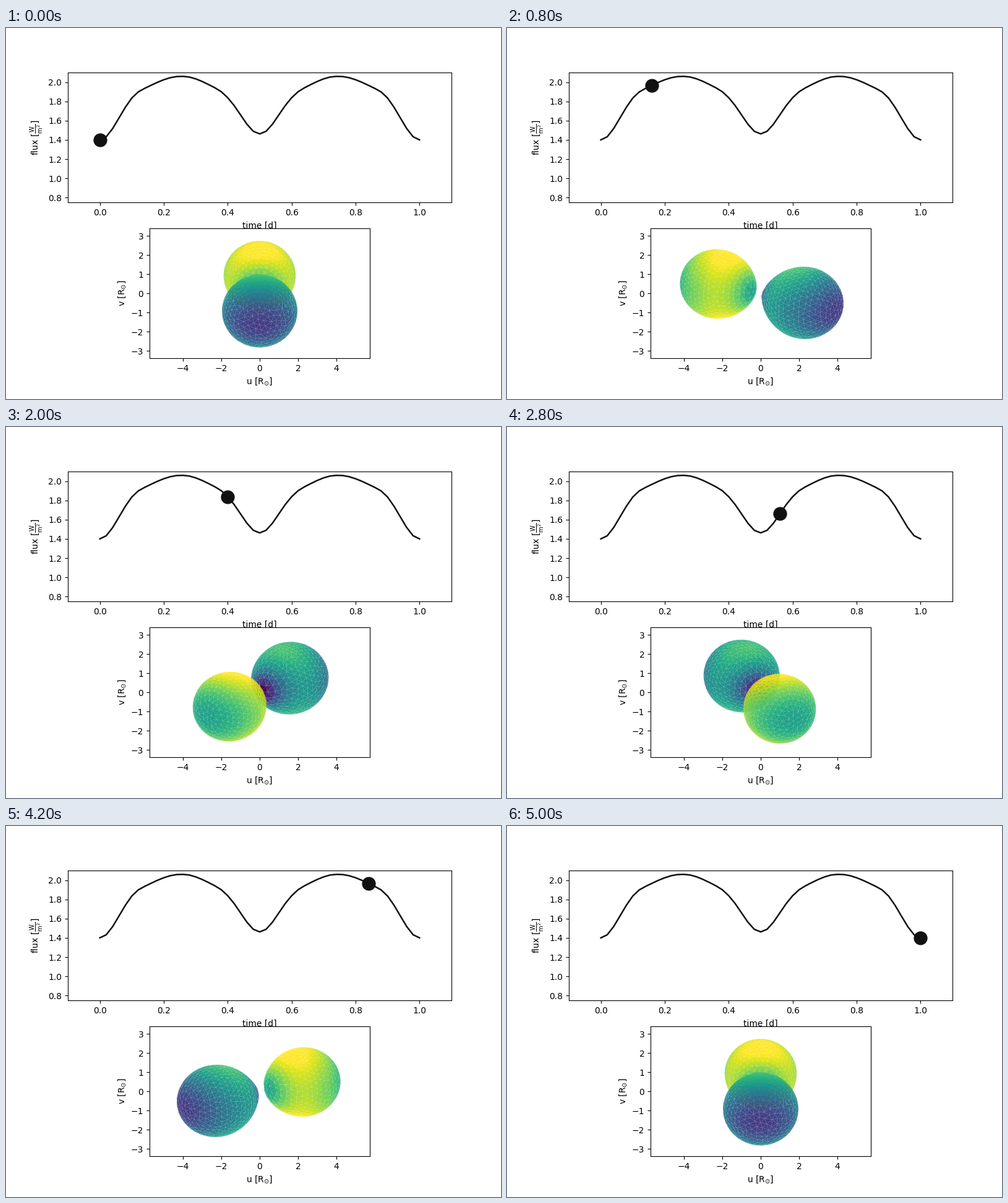
A matplotlib script for the animation above (5.1 s loop, 800 by 600 pixels).

```python
import numpy as np
import matplotlib.pyplot as plt
from matplotlib.animation import FuncAnimation
from matplotlib.collections import PolyCollection
from matplotlib.tri import Triangulation

FRAMES = 51
SMA = 5.3                    # orbital separation in solar radii
INCL = np.radians(70)
RINGS = 22
INK = "#111111"
rng = np.random.default_rng(4)


def potential(p):
    """Roche potential for equal masses, separation 1, companion at x = 1."""
    x, y, z = p.T
    r = np.sqrt(x**2 + y**2 + z**2)
    d = np.sqrt((1 - x)**2 + y**2 + z**2)
    return 1 / r + 1 / d - x + x**2 + y**2


def gravity(p):
    x, y, z = p.T
    r3 = (x**2 + y**2 + z**2)**1.5
    d3 = ((1 - x)**2 + y**2 + z**2)**1.5
    return np.column_stack([
        -x / r3 + (1 - x) / d3 - 1 + 2 * x,
        -y / r3 - y / d3 + 2 * y,
        -z / r3 - z / d3,
    ])


def sphere_mesh():
    """Unit vectors in jittered rings around the x axis, and their triangles."""
    step = np.pi / RINGS
    theta, phi = [0.0], [0.0]
    for k in range(1, RINGS):
        n = max(6, round(2 * np.pi * np.sin(k * step) / step))
        wobble = 0.14 * step * (k < RINGS - 1)
        angles = 2 * np.pi * (np.arange(n) + rng.random()) / n
        theta.extend(k * step + wobble * rng.uniform(-1, 1, n))
        phi.extend(angles + wobble * rng.uniform(-1, 1, n) / np.sin(k * step))
    theta, phi = np.array(theta), np.array(phi)

    # A stereographic projection keeps the Delaunay property
    flat = np.tan(theta / 2)
    tris = Triangulation(flat * np.cos(phi), flat * np.sin(phi)).triangles

    # Close the far end with a fan
    total = len(theta)
    rim = np.arange(total - n, total)
    fan = np.column_stack([rim, np.roll(rim, -1), np.full(n, total)])
    theta, phi = np.append(theta, np.pi), np.append(phi, 0)
    dirs = np.column_stack([
        np.cos(theta), np.sin(theta) * np.cos(phi), np.sin(theta) * np.sin(phi)
    ])
    return dirs, np.vstack([tris, fan])


def surface(dirs, level):
    """Points where the potential equals level, by bisection."""
    lo, hi = np.full(len(dirs), 0.05), np.full(len(dirs), 0.5)
    for _ in range(45):
        mid = (lo + hi) / 2
        inside = potential(dirs * mid[:, None]) > level
        lo, hi = np.where(inside, mid, lo), np.where(inside, hi, mid)
    return dirs * lo[:, None]


class Star:
    def __init__(self, level, side, polar):
        dirs, tris = sphere_mesh()
        pole = surface(np.array([[0.0, 0.0, 1.0]]), level)
        self.side = side
        self.tris = surface(dirs, level)[tris]

        mid_dirs = dirs[tris].mean(axis=1)
        mid_dirs /= np.linalg.norm(mid_dirs, axis=1)[:, None]
        mids = surface(mid_dirs, level)
        grav = gravity(mids)
        size = np.linalg.norm(grav, axis=1)
        self.normals = -grav / size[:, None]

        # Gravity darkening plus heating by the wide disc of the companion
        ratio = size / np.linalg.norm(gravity(pole))
        to_mate = np.array([1.0, 0.0, 0.0]) - mids
        dist = np.linalg.norm(to_mate, axis=1)
        cosine = (self.normals * to_mate).sum(axis=1) / dist
        spread = 0.36 / dist
        heat = 0.21 * np.clip((cosine + spread) / (1 + spread), 0, None) / dist
        value = polar - 1.22 * (1 - ratio) + heat
        self.colors = plt.cm.viridis(np.clip(value, 0, 1))

    def turn(self, p, phase):
        """Rotate from the star's axes to (u, v, depth)."""
        s, c = np.sin(phase), np.cos(phase)
        along, across, z = -self.side * p[..., 0], self.side * p[..., 1], p[..., 2]
        u = along * s + across * c
        near = along * c - across * s
        v = z * np.sin(INCL) - near * np.cos(INCL)
        depth = near * np.sin(INCL) + z * np.cos(INCL)
        return np.stack([u, v, depth], axis=-1)

    def visible(self, phase):
        seen = self.turn(self.normals, phase)[:, 2] > 0
        tris = self.turn(self.tris[seen] - [0.5, 0, 0], phase) * SMA
        return tris, self.colors[seen]


stars = [Star(3.762, 1, 0.67), Star(3.88, -1, 1.0)]

# Light curve, symmetric about half a period
half = [1.400, 1.432, 1.517, 1.628, 1.740, 1.835, 1.898, 1.935, 1.967,
        1.998, 2.025, 2.046, 2.058, 2.060, 2.053, 2.034, 2.007, 1.975,
        1.941, 1.900, 1.838, 1.757, 1.660, 1.563, 1.489, 1.462]
flux = np.array(half + half[-2::-1])
time = np.linspace(0, 1, FRAMES)

fig, (top, sky) = plt.subplots(2, 1, figsize=(8, 6), dpi=100)

top.plot(time, flux, color=INK, lw=1.8)
marker, = top.plot([], [], "o", color=INK, ms=15)
top.set(xlim=(-0.1, 1.1), ylim=(0.75, 2.1),
        xticks=np.linspace(0, 1, 6), yticks=np.linspace(0.8, 2.0, 7),
        ylabel=r"flux [$\mathrm{\frac{W}{m^{2}}}$]")
top.set_xlabel("time [d]", labelpad=5.4)

sky.set_aspect("equal", adjustable="box")
sky.set(xlim=(-5.75, 5.75), ylim=(-3.385, 3.401),
        xticks=range(-4, 5, 2), yticks=range(-3, 4),
        xlabel=r"u [$\mathrm{R_{\odot}}$]", ylabel=r"v [$\mathrm{R_{\odot}}$]")
mesh = PolyCollection([], edgecolors="none", linewidths=0)
sky.add_collection(mesh, autolim=False)


def update(i):
    marker.set_data([time[i]], [flux[i]])
    parts = [star.visible(2 * np.pi * time[i]) for star in stars]
    tris = np.concatenate([p[0] for p in parts])
    colors = np.concatenate([p[1] for p in parts])
    order = np.argsort(tris[:, :, 2].mean(axis=1))
    mesh.set_verts(tris[order, :, :2])
    mesh.set_facecolor(colors[order])
    return marker, mesh


anim = FuncAnimation(fig, update, frames=FRAMES, interval=100,
                     repeat=True, repeat_delay=0)
plt.show()
```
